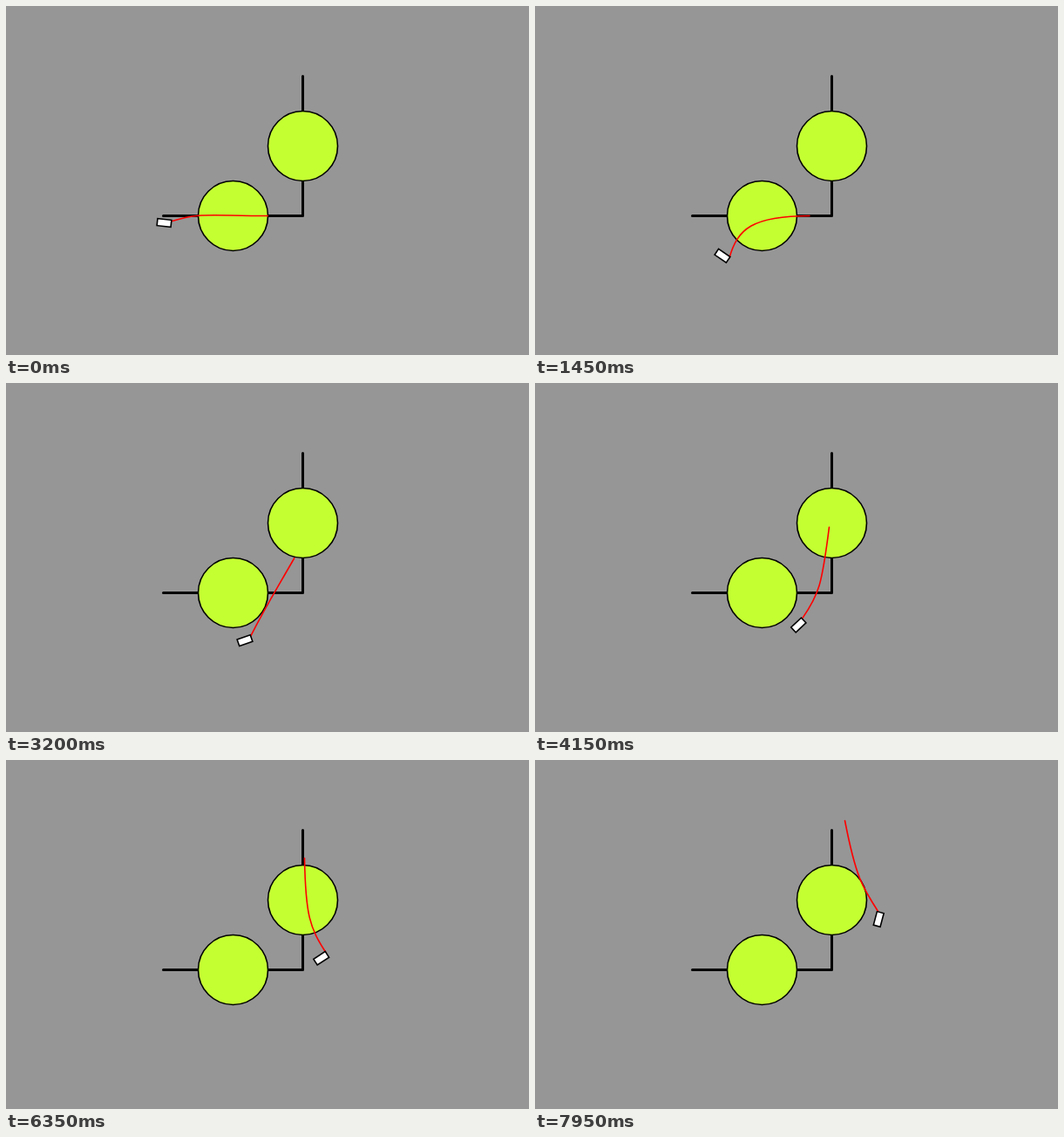
These frames come from a looping animation (600x400 px, 8 s). An HTML page with a canvas:

```html
<!DOCTYPE html>
<html lang="en">
<head>
<meta charset="utf-8">
<style>
  html, body { margin: 0; width: 100%; height: 100%; overflow: hidden; background: #969696; }
  canvas { display: block; }
</style>
</head>
<body>
<canvas id="stage" width="600" height="400"></canvas>
<script>
const ctx = document.getElementById('stage').getContext('2d');
const LOOP = 8000, STEP = 50;
const START = { x: 181, y: 248 }, SPEED = 0.0354;  // px per ms
const HITCH = { x: 8, y: -2.5 };                   // where the red curve meets the cart
const LAUNCH_REACH = 34, ARRIVAL_REACH = 66;

// Each track eases linearly between [time, value]; angles are in degrees.
const heading = track([0, 6], [150, 62], [800, 52], [2150, 15], [3400, -26],
  [4150, -43], [5350, -42], [6350, -33], [7950, -75]);
const launch = track([0, -18], [800, -50], [2150, -101], [3400, -56], [4150, -55],
  [5350, -83], [6350, -123]);
const arrival = track([2600, 0], [3400, -80], [6350, -91], [7950, -101]);
const tipX = track([0, 300], [2600, 326], [4150, 337], [6350, 342], [7950, 355]);
const tipY = track([2600, 240], [3400, 187], [5350, 129], [6350, 112], [7950, 69]);

function track(...keys) {
  return time => {
    const next = keys.findIndex(([t]) => t > time);
    if (next === 0) return keys[0][1];
    if (next < 0) return keys[keys.length - 1][1];
    const [t0, v0] = keys[next - 1], [t1, v1] = keys[next];
    return v0 + (v1 - v0) * (time - t0) / (t1 - t0);
  };
}

function move({ x, y }, degrees, distance) {
  const angle = degrees * Math.PI / 180;
  return { x: x + distance * Math.cos(angle), y: y + distance * Math.sin(angle) };
}

// The cart drives at constant speed along its heading.
function cartAt(time) {
  const dt = 10;
  let cart = START;
  for (let t = 0; t < time; t += dt) cart = move(cart, heading(t + dt / 2), SPEED * dt);
  return cart;
}

function drawScene() {
  ctx.strokeStyle = '#000';
  ctx.lineWidth = 3;
  ctx.lineCap = ctx.lineJoin = 'round';
  ctx.beginPath();
  ctx.moveTo(180, 240);
  ctx.lineTo(340, 240);
  ctx.lineTo(340, 80);
  ctx.stroke();
  ctx.fillStyle = '#c4ff32';
  ctx.lineWidth = 1.6;
  for (const [x, y] of [[260, 240], [340, 160]]) {
    ctx.beginPath();
    ctx.arc(x, y, 40, 0, 2 * Math.PI);
    ctx.fill();
    ctx.stroke();
  }
}

function drawCurve(cart, time) {
  const turn = heading(time);
  const nose = move(move(cart, turn, HITCH.x), turn + 90, HITCH.y);
  const tip = { x: tipX(time), y: tipY(time) };
  const out = move(nose, launch(time), LAUNCH_REACH);
  const back = move(tip, arrival(time), -ARRIVAL_REACH);
  ctx.strokeStyle = '#f00';
  ctx.beginPath();
  ctx.moveTo(nose.x, nose.y);
  ctx.bezierCurveTo(out.x, out.y, back.x, back.y, tip.x, tip.y);
  ctx.stroke();
}

function drawCart(cart, time) {
  ctx.save();
  ctx.translate(cart.x, cart.y);
  ctx.rotate(heading(time) * Math.PI / 180);
  ctx.lineJoin = 'miter';
  ctx.fillStyle = '#fff';
  ctx.strokeStyle = '#000';
  ctx.fillRect(-8, -4, 16, 8);
  ctx.strokeRect(-8, -4, 16, 8);
  ctx.restore();
}

function frame() {
  const time = Math.floor(performance.now() % LOOP / STEP) * STEP;
  const cart = cartAt(time);
  ctx.setTransform(1, 0, 0, 1, 0.5, 0.5);  // coordinates name pixel centres
  ctx.clearRect(-1, -1, 602, 402);
  drawScene();
  drawCurve(cart, time);
  drawCart(cart, time);
  requestAnimationFrame(frame);
}
frame();
</script>
</body>
</html>
```
